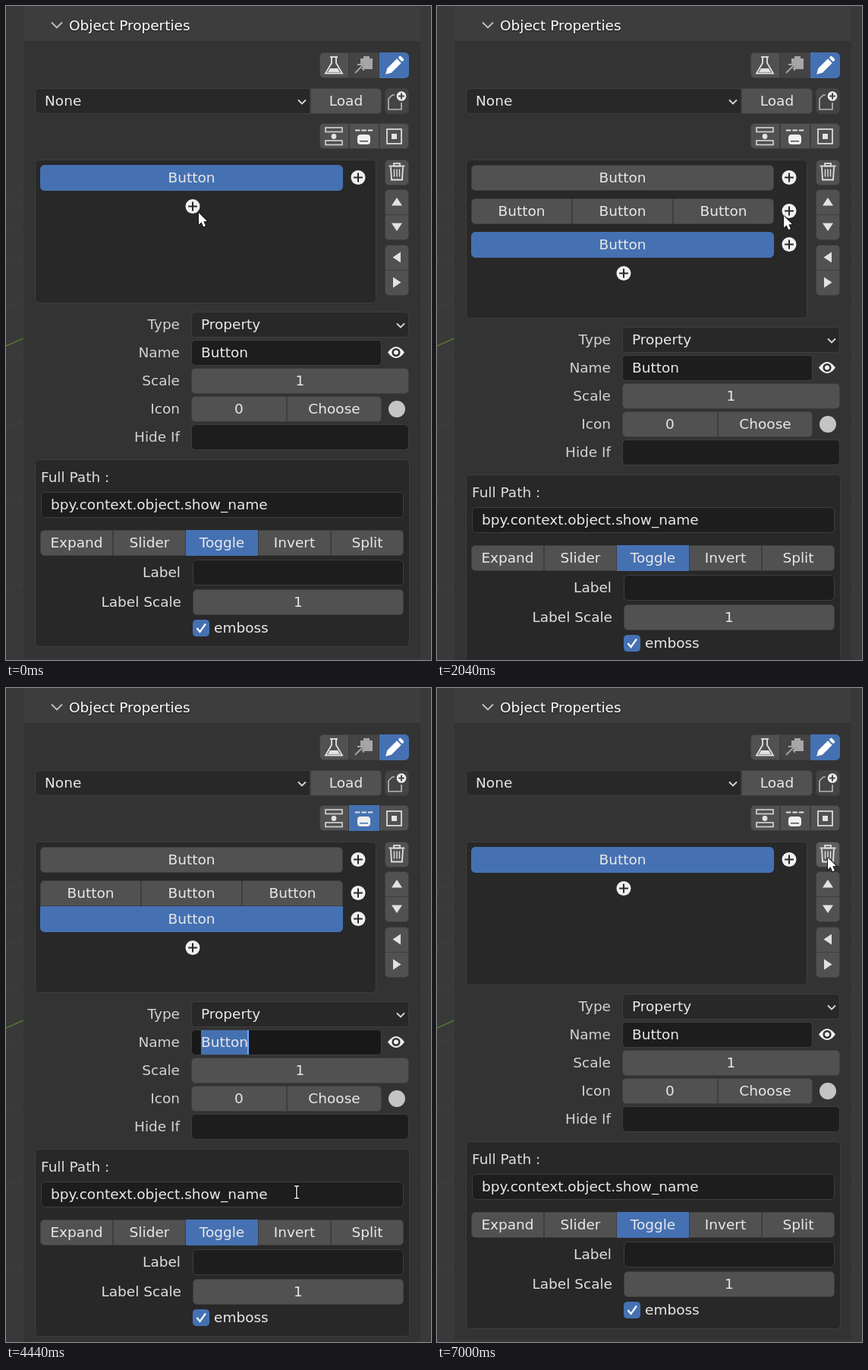
An HTML page with a canvas that plays this animation: 560x860 px, repeating every 7160 ms.

```html
<!DOCTYPE html>
<html lang="en">
<head>
<meta charset="utf-8">
<title>Object Properties</title>
<style>
html, body { margin: 0; width: 100%; height: 100%; overflow: hidden; background: #393939; }
canvas { display: block; }
</style>
</head>
<body>
<canvas id="stage" width="560" height="860"></canvas>
<script>
const ctx = document.getElementById('stage').getContext('2d');
const LOOP = 7160, STEP = 40, CLICK = 280, H = 34;
const FONT = '18.5px "DejaVu Sans", sans-serif';
const C = {
  view: '#393939', head: '#3d3d3d', body: '#333333', box: '#282828', field: '#1d1d1d', edge: '#3e3e3e',
  btn: '#515151', hover: '#5e5e5e', dim: '#444444', blue: '#4571b2',
  text: '#e8e8e8', label: '#d2d2d2', icon: '#e2e2e2', white: '#ffffff'
};

// The pointer rests between moves
const MOVES = [
  { from: 40, to: 120, x: 248, y: 266 },
  { from: 320, to: 600, x: 249, y: 304 },
  { from: 680, to: 1200, x: 457, y: 276 },
  { from: 2040, to: 2560, x: 409, y: 280 },
  { from: 2560, to: 2840, x: 463, y: 170 },
  { from: 3040, to: 3880, x: 349, y: 462 },
  { from: 4080, to: 4440, x: 383, y: 663 },
  { from: 5080, to: 5760, x: 515, y: 223 }
];

function pointer(t) {
  let x = 254, y = 272;
  for (const m of MOVES) {
    const u = Math.min(1, Math.max(0, (t - m.from) / (m.to - m.from)));
    const k = u * u * (3 - 2 * u);
    x += (m.x - x) * k;
    y += (m.y - y) * k;
  }
  return [Math.round(x), Math.round(y)];
}

function stateAt(t) {
  const after = at => t >= at ? 1 : 0;
  const within = (a, b) => t >= a && t < b;
  const removed = i => after(6120 + CLICK * i);
  const s = {
    rows: 1 + after(320) + after(640) - removed(0) - removed(3),
    cols: 1 + after(1520) + after(1520 + CLICK) - removed(1) - removed(2),
    joined: within(3040, 6120),
    name: within(3880, 4600),
    path: within(4920, 5840),
    trash: after(5840)
  };
  // Every gap between rows makes the list taller
  s.shift = 10 * (s.rows - 1 - s.joined);
  return s;
}

// Drawing helpers; boxes are x, y, width, height
function rect(x, y, w, h, fill, radius = 5, edge = fill === C.blue ? fill : C.edge) {
  ctx.beginPath();
  ctx.roundRect(x + .5, y + .5, w - 1, h - 1, radius);
  ctx.fillStyle = fill;
  ctx.fill();
  ctx.strokeStyle = edge;
  ctx.lineWidth = 1;
  ctx.stroke();
}

function text(s, x, y, align = 'left', color = C.text) {
  ctx.font = FONT;
  ctx.textAlign = align;
  ctx.fillStyle = color;
  ctx.fillText(s, x, y);
}

function button(x, y, w, label, fill = C.btn, radius = 5) {
  rect(x, y, w, H, fill, radius);
  text(label, x + w / 2, y + 23, 'center');
}

// Equal buttons side by side, rounded only at the outer corners
function strip(x, y, w, labels, fillOf = () => C.btn, up = 5, down = 5) {
  const n = labels.length;
  labels.forEach((label, i) => {
    const a = Math.round(x + w * i / n), b = Math.round(x + w * (i + 1) / n);
    const l = i === 0, r = i === n - 1;
    button(a, y, b - a, label, fillOf(i), [l ? up : 0, r ? up : 0, r ? down : 0, l ? down : 0]);
  });
}

function trace(pts) {
  ctx.beginPath();
  pts.forEach(p => ctx.lineTo(p[0], p[1]));
}

function fill(color, ...pts) {
  trace(pts);
  ctx.fillStyle = color;
  ctx.fill();
}

function line(color, width, ...pts) {
  trace(pts);
  ctx.strokeStyle = color;
  ctx.lineWidth = width;
  ctx.stroke();
}

function block(color, x, y, w, h) {
  ctx.fillStyle = color;
  ctx.fillRect(x, y, w, h);
}

function frame(color, x, y, w, h) {
  ctx.strokeStyle = color;
  ctx.lineWidth = 1.7;
  ctx.strokeRect(x, y, w, h);
}

function disc(color, x, y, r) {
  ctx.beginPath();
  ctx.arc(x, y, r, 0, 7);
  ctx.fillStyle = color;
  ctx.fill();
}

function at(x, y, angle, paint) {
  ctx.save();
  ctx.translate(x, y);
  ctx.rotate(angle);
  paint();
  ctx.restore();
}

function plus(x, y, r = 9.5, ink = C.box) {
  disc('#f0f0f0', x, y, r);
  const a = r * .62;
  line(ink, 2, [x - a, y], [x + a, y]);
  line(ink, 2, [x, y - a], [x, y + a]);
}

function chevron(x, y, w = 5, color = '#d8d8d8') {
  line(color, 1.8, [x - w, y - w / 2], [x, y + w / 2], [x + w, y - w / 2]);
}

function viewport() {
  block(C.view, 0, 0, 560, 860);
  for (let i = 0; i < 9; i++) {
    const y = 240 + 9 * i + 7 * i * i;
    line('#404040', 1, [0, y + 8], [23, y]);
    line('#404040', 1, [546, y + 2], [560, y + 7]);
  }
  line('#53792c', 1.6, [0, 447], [23, 437]);
}

function flask(x, y) {
  line(C.icon, 1.8, [x - 5, y - 11], [x + 5, y - 11]);
  line(C.icon, 1.8, [x - 3, y - 11], [x - 3, y - 3], [x - 11, y + 10.5],
    [x + 11, y + 10.5], [x + 3, y - 3], [x + 3, y - 11]);
  fill(C.icon, [x - 5, y + 4], [x + 5, y + 4], [x + 8, y + 9], [x - 8, y + 9]);
}

function clipboard(x, y) {
  const ink = '#a6a6a6';
  block(ink, x - 5, y - 9, 16, 14);
  block(ink, x - 1, y - 12, 8, 4);
  [[C.dim, 4], [ink, 1.8]].forEach(([c, w]) => line(c, w, [x - 12, y + 10], [x - 1, y - 1]));
  line(ink, 1.8, [x - 9, y - 1], [x - 1, y - 1], [x - 1, y + 7]);
}

function pencil(x, y) {
  at(x, y, Math.PI / 4, () => {
    fill(C.white, [-4, -9], [4, -9], [4, 9], [0, 16], [-4, 9]);
    rect(-4, -15, 8, 4, C.white, 1.5, C.white);
  });
}

function topIcons() {
  strip(413, 61, 118, ['', '', ''], i => [C.btn, C.dim, C.blue][i]);
  flask(432, 78);
  clipboard(472, 78);
  pencil(511.5, 78.5);
}

function alignIcons(joined) {
  strip(413, 154, 118, ['', '', ''], i => i === 1 && joined ? C.blue : C.btn);
  [160, 177].forEach(y => frame('#cfcfcf', 421, y, 22, 5.5));
  disc(C.icon, 432, 171.5, 3.4);
  for (let i = 0; i < 3; i++) block(C.icon, 460 + i * 8.4, 162.5, 6.4, 2);
  rect(463, 169, 17, 13, '#f0f0f0', 3, '#f0f0f0');
  block(joined ? C.blue : C.btn, 466, 177, 11, 1.5);
  frame(C.icon, 502, 162, 19, 19);
  block(C.icon, 508, 168, 7, 7);
}

function preset() {
  rect(38, 108, 363, H, C.box, [5, 0, 0, 5]);
  text('None', 51, 131);
  chevron(390, 126);
  button(401, 108, 94, 'Load', C.btn, [0, 5, 5, 0]);
  rect(499, 108, 32, H, C.dim);
  line('#b4b4b4', 1.7, [512, 117], [509, 117], [504, 122], [504, 136], [521, 136], [521, 127]);
  plus(521, 118.5, 6.3, C.dim);
}

function trashCan(x, y) {
  line(C.icon, 1.8, [x - 10.5, y - 7], [x + 10.5, y - 7]);
  frame(C.icon, x - 4, y - 10.5, 8, 3.5);
  line(C.icon, 1.8, [x - 8, y - 6], [x - 7, y + 11], [x + 7, y + 11], [x + 8, y - 6]);
  [-3.5, 0, 3.5].forEach(d => line(C.icon, 1.4, [x + d, y - 3], [x + d, y + 7]));
}

function sideButtons(hover) {
  rect(499, 202, 32, H, hover ? C.hover : C.btn);
  trashCan(515, 217.5);
  // Up, down, left, right
  [0, 2, 3, 1].forEach((turn, i) => {
    const y = 241 + 33 * i + (i > 1 ? 7 : 0);
    rect(499, y, 32, H, C.btn, i % 2 ? [0, 0, 5, 5] : [5, 5, 0, 0]);
    at(515, y + 16.5, turn * Math.PI / 2, () => fill(C.icon, [-7, 5], [0, -5.5], [7, 5]));
  });
}

function list(s) {
  rect(38, 202, 450, 189 + s.shift, C.box);
  let top = 209;
  for (let i = 0; i < s.rows; i++) {
    if (i) top += i === 2 && s.joined ? 34 : 44;
    const labels = Array(i === 1 ? s.cols : 1).fill('Button');
    const active = c => i === s.rows - 1 && c === labels.length - 1 ? C.blue : C.btn;
    strip(45, top, 399, labels, active, s.joined && i === 2 ? 0 : 5, s.joined && i === 1 ? 0 : 5);
    plus(464, top + 16.5);
  }
  plus(246, top + 54.5);
}

function field(x, y, w, value = '', editing = false) {
  rect(x, y, w, H, editing ? '#181818' : C.field);
  const left = x + 13;
  if (editing) {
    ctx.font = FONT;
    const len = ctx.measureText(value).width;
    block(C.blue, left, y + 1, len, H - 2);
    block('#71a8ff', left + len - 1, y + 1, 2, H - 2);
  }
  text(value, left, y + 23);
}

function eye(x, y) {
  ctx.beginPath();
  ctx.moveTo(x - 11, y);
  ctx.quadraticCurveTo(x, y - 15, x + 11, y);
  ctx.quadraticCurveTo(x, y + 15, x - 11, y);
  ctx.fillStyle = '#f2f2f2';
  ctx.fill();
  disc(C.body, x, y, 5.6);
  disc('#f2f2f2', x, y, 3);
}

function settings(s) {
  const row = i => 402 + 37 * i;
  ['Type', 'Name', 'Scale', 'Icon', 'Hide If'].forEach((n, i) =>
    text(n, 229, row(i) + 23, 'right', C.label));
  rect(244, row(0), 287, H, C.box);
  text('Property', 257, row(0) + 23);
  chevron(520, row(0) + 18);
  field(244, row(1), 251, 'Button', s.name);
  eye(514, row(1) + 16.5);
  button(244, row(2), 287, '1');
  strip(244, row(3), 251, ['0', 'Choose']);
  disc('#c4c4c4', 515, row(3) + 17, 11);
  field(244, row(4), 287);
}

function details(s) {
  rect(38, 596, 494, 247, C.box);
  text('Full Path :', 46, 626, 'left', '#dedede');
  field(46, 639, 478, 'bpy.context.object.show_name', s.path);
  strip(45, 689, 479, ['Expand', 'Slider', 'Toggle', 'Invert', 'Split'], i => i === 2 ? C.blue : C.btn);
  text('Label', 230, 751, 'right', '#dedede');
  field(246, 728, 278);
  text('Label Scale', 231, 790, 'right', '#dedede');
  button(246, 767, 278, '1');
  rect(246, 807, 22, 22, C.blue, 4);
  line(C.white, 2.2, [251.5, 818], [255.5, 823], [263, 812.5]);
  text('emboss', 274, 824);
}

function beam() {
  for (const [color, w] of [['#000000', 3.4], ['#ffffff', 1.4]]) {
    line(color, w, [0, -8], [0, 8]);
    [-8, 8].forEach(y => line(color, w, [-3, y], [3, y]));
  }
}

function arrow() {
  const shape = [[0, 0], [0, 15.5], [3.6, 12.2], [6.2, 18.3], [8.9, 17.1], [6.3, 11.3], [11, 11]];
  line('#151515', 2, ...shape, shape[0]);
  fill(C.white, ...shape);
}

function header() {
  block(C.head, 23, 0, 523, 46);
  chevron(67, 25, 7, '#c2c2c2');
  ctx.shadowColor = 'rgba(0,0,0,.6)';
  ctx.shadowBlur = 2;
  ctx.shadowOffsetY = 1;
  text('Object Properties', 83, 32, 'left', C.white);
  ctx.shadowColor = 'transparent';
}

function draw(t) {
  const s = stateAt(t);
  viewport();
  block(C.body, 23, 0, 523, 857 + s.shift);
  header();
  topIcons();
  preset();
  alignIcons(s.joined);
  list(s);
  sideButtons(s.trash);
  at(0, s.shift, 0, () => {
    settings(s);
    details(s);
  });
  at(...pointer(t), 0, s.name || s.path ? beam : arrow);
}

const start = performance.now();
function tick() {
  const t = (performance.now() - start) % LOOP;
  draw(Math.floor(t / STEP) * STEP);
  requestAnimationFrame(tick);
}
tick();
</script>
</body>
</html>
```
